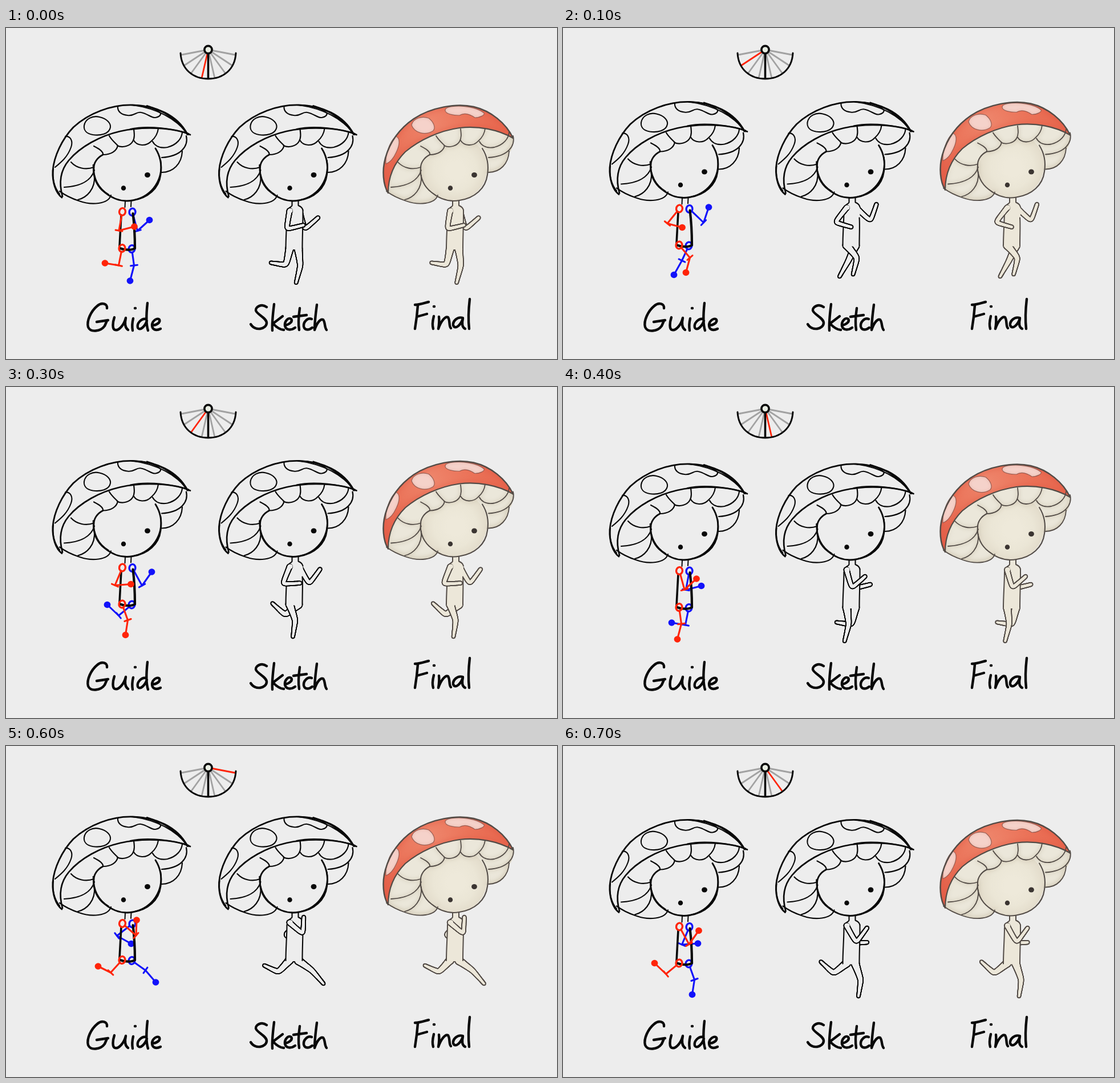
These frames come from a looping animation (966 by 580 pixels, 800 ms). An HTML page with a canvas:

```html
<!DOCTYPE html>
<html lang="en">
<head>
<meta charset="utf-8">
<title>Mushroom run cycle</title>
<style>
html, body { margin: 0; width: 100%; height: 100%; overflow: hidden; background: #ededed; }
canvas { display: block; width: 966px; height: 580px; }
</style>
</head>
<body>
<canvas id="stage" width="966" height="580" role="img" aria-label="Guide, Sketch, Final"></canvas>
<script>
const ctx = document.getElementById('stage').getContext('2d');
const PAPER = '#ededed', INK = '#080808', RED = '#ff2408', BLUE = '#1212fa';
const CREAM = '#ece7d9', PENCIL = '#524b46';
const STEP = 100, STEPS = 8;
const SKETCH_X = 291.5, FINAL_X = 573;
const BOB = [0, -5.5, -11, -5.5];
const SPOKES = [[-47, 9], [-41, 27], [-29, 40], [-11, 48]];
const SPOKE_ORDER = [3, 1, 0, 2];

// Middle and end joint of a limb, relative to its root, for each step.
const ARM = [
  [-6, 33, 21, 26], [-21, 26, 5, 33], [-27, 21, -2, 35], [-13, 31, 15, 29],
  [9, 33, 30, 14], [25, 24, 34, -3], [24, 21, 25, -6], [17, 31, 34, 7]
];
const LEG = [
  [-6, 30, -30, 26], [19, 22, 12, 48], [24, 17, 42, 38], [10, 28, 6, 54],
  [4, 29, -3, 56], [-12, 26, -26, 51], [-20, 22, -42, 11], [-23, 19, -43, 0]
];

const CAP = `M98 297 C87 289 81 270 82 250 C84 225 98 195 118 174 C145 149 185 134 222 135
  C262 136 300 152 318 186`;
const CAP_ROUGH = `M94 291 C85 280 81 265 83 247 M222 135 C258 140 295 155 320 187
  M247 136 C277 145 301 161 318 187`;
const RIM = 'M99 295 C92 270 95 250 110 232 C130 208 165 189 200 181 C240 172 292 174 323 187';
const RIM_ROUGH = 'M218 177 C250 170 297 177 320 185';
const SPOTS = `M137 171 C139 159 152 153 164 156 C177 159 184 167 183 174 C181 186 165 189 152 187
  C141 185 136 179 137 171 M196 137 C195 147 203 152 213 153 C225 155 228 146 237 148
  C248 150 255 158 262 157 C268 156 272 153 271 149 C262 140 240 135 222 135
  M104 190 C113 189 118 198 114 209 C108 226 97 235 86 244`;
const GILLS = `M114 235 C124 246 140 249 154 244 M102 279 C122 278 148 272 155 249
  M155 258 C157 282 142 297 126 301 M94 286 C106 295 116 299 128 303 C150 311 179 309 184 293
  M154 207 C162 211 171 216 170 222 C185 222 194 215 196 206 C191 201 185 196 181 189
  M195 206 C205 211 218 206 222 199 C226 193 225 185 224 177
  M224 197 C230 207 246 208 255 198 C262 192 266 185 267 176
  M257 199 C262 208 272 211 283 209 C299 205 308 194 309 183
  M316 189 C320 206 308 225 273 227 M309 216 C308 238 293 253 273 253`;
const FACE = `M170 222 C160 227 154 236 154 245 C152 263 161 279 173 288 C189 301 206 305 222 302
  C249 298 268 281 271 257 C274 238 269 222 262 211`;
const FACE_ROUGH = 'M153 240 C153 265 163 282 180 292 M271 232 C276 265 257 293 226 301';

const GILL_FILL = `M94 286 L108 215 L187 177 L257 172 L316 189 C318 208 311 218 309 218
  C306 245 289 254 273 253 L184 293 C177 311 142 309 128 303 C112 298 103 294 94 286Z`;
const BRIM_FILL = `M114 235 C124 246 140 249 154 244 C156 232 163 225 170 222
  C185 222 194 215 195 206 C205 211 218 206 222 199 C228 208 246 208 255 198
  C262 208 272 211 283 208 L314 190 C280 172 240 173 200 180 C165 187 130 208 114 235Z`;
const TOP_EDGE = `M97 289 C88 275 86 250 92 228 C100 200 117 176 142 159 C172 139 217 131 247 138
  C277 145 304 167 316 193`;
const LOW_EDGE = ' C290 178 255 171 222 175 C187 180 152 196 127 217 C107 237 97 262 97 289';
const PINK = `M138 170 C141 158 156 154 168 158 C176 164 181 174 176 180 C162 189 143 184 138 170Z
  M197 144 C197 151 212 153 222 153 C232 147 242 152 249 157 C259 157 267 152 265 149
  C253 139 227 135 207 138 C201 139 197 141 197 144Z
  M110 190 C119 192 117 206 111 218 C106 229 99 236 93 238 C92 222 99 200 110 190Z`;

const TORSO = `M210 303 V311 C209 314 203 314 201 321 C201 345 199 365 199 388 H228
  C228 365 229 345 229 323 C229 315 226 313 221 311 V303Z`;
const NECK = 'M210 303 V311 C209 314 204 314 201 320 M221 303 V311 C226 313 228 315 229 319';
const BACK = 'M201 324 C201 345 199 365 199 387';

const LABELS = `M177 491 C178 483 168 480 160 487 C149 496 141 513 144 524 C148 534 166 532 173 522
  L177 513 M159 515 L179 512 M190 507 C187 516 186 527 191 529 C198 531 207 520 210 508
  C208 517 208 525 214 529 M223 509 C221 517 221 524 222 530 M226 491 l1 0
  M246 510 C237 508 229 518 231 525 C235 532 244 522 247 513 M248 482 C246 500 245 518 249 530
  M256 521 C264 521 271 516 269 511 C266 507 257 512 256 520 C256 529 263 531 271 527
  M457 489 C448 482 437 489 438 495 C440 502 457 508 457 517 C456 528 437 532 429 519
  M470 484 C468 500 466 515 467 530 M485 505 L468 518 C474 524 480 529 487 529
  M489 521 C498 519 503 514 500 510 C495 506 488 514 489 522 C491 530 500 530 507 525
  M515 491 C513 505 512 518 514 529 M504 506 L527 503
  M536 510 C529 507 521 515 522 523 C524 531 532 529 537 525
  M545 485 C543 500 541 515 541 529 C545 517 551 509 556 511 C560 516 558 524 562 529
  M722 486 C721 500 719 515 717 527 M717 485 C727 485 736 481 741 480 M720 506 L738 501
  M750 505 C748 513 747 521 749 527 M750 488 l1 0
  M759 506 C760 513 759 521 758 527 C762 515 770 504 775 507 C779 513 776 522 780 526
  M801 508 C791 505 783 514 784 521 C788 530 798 519 801 509 C799 518 800 525 805 527
  M813 475 C811 492 810 510 812 527`;

function line(d, width, color = INK) {
  ctx.lineWidth = width;
  ctx.strokeStyle = color;
  ctx.stroke(new Path2D(d));
}

function fill(d, color) {
  ctx.fillStyle = color;
  ctx.fill(new Path2D(d));
}

function oval(x, y, rx, ry = rx, tilt = 0) {
  ctx.beginPath();
  ctx.ellipse(x, y, rx, ry, tilt, 0, Math.PI * 2);
}

function dot(x, y, rx, ry, color) {
  oval(x, y, rx, ry);
  ctx.fillStyle = color;
  ctx.fill();
}

function at(x, y, draw) {
  ctx.save();
  ctx.translate(x, y);
  draw();
  ctx.restore();
}

function joints(x, y, [mx, my, ex, ey]) {
  return [[x, y], [x + mx, y + my], [x + ex, y + ey]];
}

function drawPendulum(step) {
  const side = step < 4 ? -1 : 1;
  const active = SPOKE_ORDER[step % 4];
  at(354.5, 38, () => {
    for (const s of [-1, 1]) SPOKES.forEach(([x, y], i) => {
      const hot = s === side && i === active;
      line(`M0 0 L${-s * x} ${y}`, 2.8, hot ? RED : '#a2a2a2');
    });
    line('M0 6 V50', 3.6);
    line('M-48.5 6 C-47 34 -27 51 0 51 S47 34 48.5 6', 3);
    oval(0, 0, 6.6);
    ctx.fillStyle = '#e9eee3';
    ctx.fill();
    ctx.lineWidth = 3.6;
    ctx.strokeStyle = INK;
    ctx.stroke();
  });
}

function drawBones(pts, color) {
  const [[x, y], [mx, my], [ex, ey]] = pts;
  const len = Math.hypot(mx - x, my - y);
  const ux = (mx - x) / len, uy = (my - y) / len;
  line(`M${x + ux * 6} ${y + uy * 6} L${mx} ${my} L${ex} ${ey}`, 3.1, color);
  line(`M${mx - uy * 6} ${my + ux * 6} L${mx + uy * 6} ${my - ux * 6}`, 3, color);
  oval(x, y, 5.4, 6.4, 0.15);
  ctx.lineWidth = 3.4;
  ctx.stroke();
  dot(ex, ey, 5.9, 5.8, color);
}

function drawGuideBody(step) {
  const other = (step + 4) % STEPS;
  drawBones(joints(221.5, 322.5, ARM[other]), BLUE);
  drawBones(joints(220.5, 387, LEG[other]), BLUE);
  line('M209 303 L208.5 314 M219.5 303 L219 313', 2);
  line('M202 328 C201 345 200 365 199 383', 3.6);
  line('M222.5 325 C225 345 226 365 226 386 C220 390 207 389 200 386', 4.2);
  drawBones(joints(203.5, 386, LEG[step]), RED);
  drawBones(joints(204, 322, ARM[step]), RED);
}

// Sweeps a tapering disc along a limb, slightly rounding the middle joint.
function sweep([a, m, e], [thick, thin], grow, color) {
  ctx.fillStyle = color;
  for (let t = 0; t <= 1.07; t += 0.01) {
    const s = 2 * t - 1;
    const lower = (s + Math.sqrt(s * s + 0.025)) / 2;
    const upper = 1 + s - lower;
    const [x, y] = a.map((v, i) => v + (m[i] - v) * upper + (e[i] - m[i]) * lower);
    oval(x, y, thick + (thin - thick) * Math.pow(t, 0.7) + grow);
    ctx.fill();
  }
}

function limb(pts, radii, style) {
  sweep(pts, radii, style.pen / 2, style.ink);
  sweep(pts, radii, -style.pen / 2, style.skin);
}

function drawBody(step, style) {
  const other = (step + 4) % STEPS;
  const arm = [4.6, 3.2], leg = [7, 2.9];
  const farArm = ARM[other];
  limb(joints(223, 321, farArm), arm, style);
  limb(joints(221, 387, LEG[other]), leg, style);
  limb(joints(206, 386, LEG[step]), leg, style);
  fill(TORSO, style.skin);
  line(NECK + BACK, style.pen, style.ink);
  const front = farArm[0] > 15 ? 'M228 338' : 'M229 319 L229 330';
  line(front + ' C229 350 228 365 228 387', style.pen, style.ink);
  limb(joints(205.5, 320.5, ARM[step]), arm, style);
  dot(207, 320, 4, 4, style.skin);
}

function drawEyes(color) {
  dot(248, 257.5, 4.9, 4.6, color);
  dot(206, 280.5, 4.2, 4.3, color);
}

function drawInkHead() {
  line(CAP, 2.8);
  line(CAP_ROUGH, 2.1);
  line(RIM, 2.7);
  line(RIM_ROUGH, 2.3);
  line(SPOTS, 2.1);
  line(GILLS, 2.2);
  line(FACE, 2.8);
  line(FACE_ROUGH, 2.5);
  drawEyes(INK);
}

function gradient(g, ...colors) {
  colors.forEach((c, i) => g.addColorStop(i / (colors.length - 1), c));
  return g;
}

// Soft stroke kept inside the given area.
function shade(area, d, width, color, blur) {
  ctx.save();
  ctx.clip(new Path2D(area));
  ctx.filter = `blur(${blur}px)`;
  line(d, width, color);
  ctx.restore();
}

function drawPaintedHead() {
  fill(GILL_FILL, '#ebe7da');
  shade(GILL_FILL, GILL_FILL, 6, '#dcd5c3', 4);
  dot(212, 246, 58.5, 57.5,
    gradient(ctx.createRadialGradient(216, 250, 15, 212, 246, 60), '#eee9da', '#ebe6d6', '#e2dbca'));
  fill(BRIM_FILL, '#ebe7da');
  shade(GILL_FILL, GILLS, 6, 'rgba(196,186,162,.4)', 3);

  const cap = TOP_EDGE + LOW_EDGE + 'Z';
  fill(cap, gradient(ctx.createLinearGradient(90, 270, 310, 150),
    '#e4604a', '#eb765c', '#ee846a', '#eb7258', '#e6634b'));
  shade(cap, cap, 7, 'rgba(226,88,66,.5)', 4);
  fill(PINK, '#f5d2ca');
  shade(PINK, PINK, 3, '#eebbb0', 2);

  line(PINK, 1.2, 'rgba(110,62,54,.65)');
  line(GILLS, 1.8, PENCIL);
  line(FACE, 2.1, PENCIL);
  line(TOP_EDGE, 2.5, PENCIL);
  line('M316 193' + LOW_EDGE, 2.1, PENCIL);
  drawEyes('#3b3532');
}

function render(step) {
  ctx.fillStyle = PAPER;
  ctx.fillRect(0, 0, 966, 580);
  ctx.lineCap = ctx.lineJoin = 'round';
  const bob = BOB[step % 4];
  drawPendulum(step);
  at(0, bob, () => {
    drawGuideBody(step);
    drawInkHead();
  });
  at(SKETCH_X, bob, () => {
    drawBody(step, { pen: 2.1, ink: INK, skin: PAPER });
    drawInkHead();
  });
  at(FINAL_X, bob, () => {
    drawBody(step, { pen: 2, ink: PENCIL, skin: CREAM });
    drawPaintedHead();
  });
  line(LABELS, 4.4);
}

let shown = -1;
function tick() {
  const step = Math.floor(performance.now() / STEP) % STEPS;
  if (step !== shown) render(shown = step);
  requestAnimationFrame(tick);
}
tick();
</script>
</body>
</html>
```
